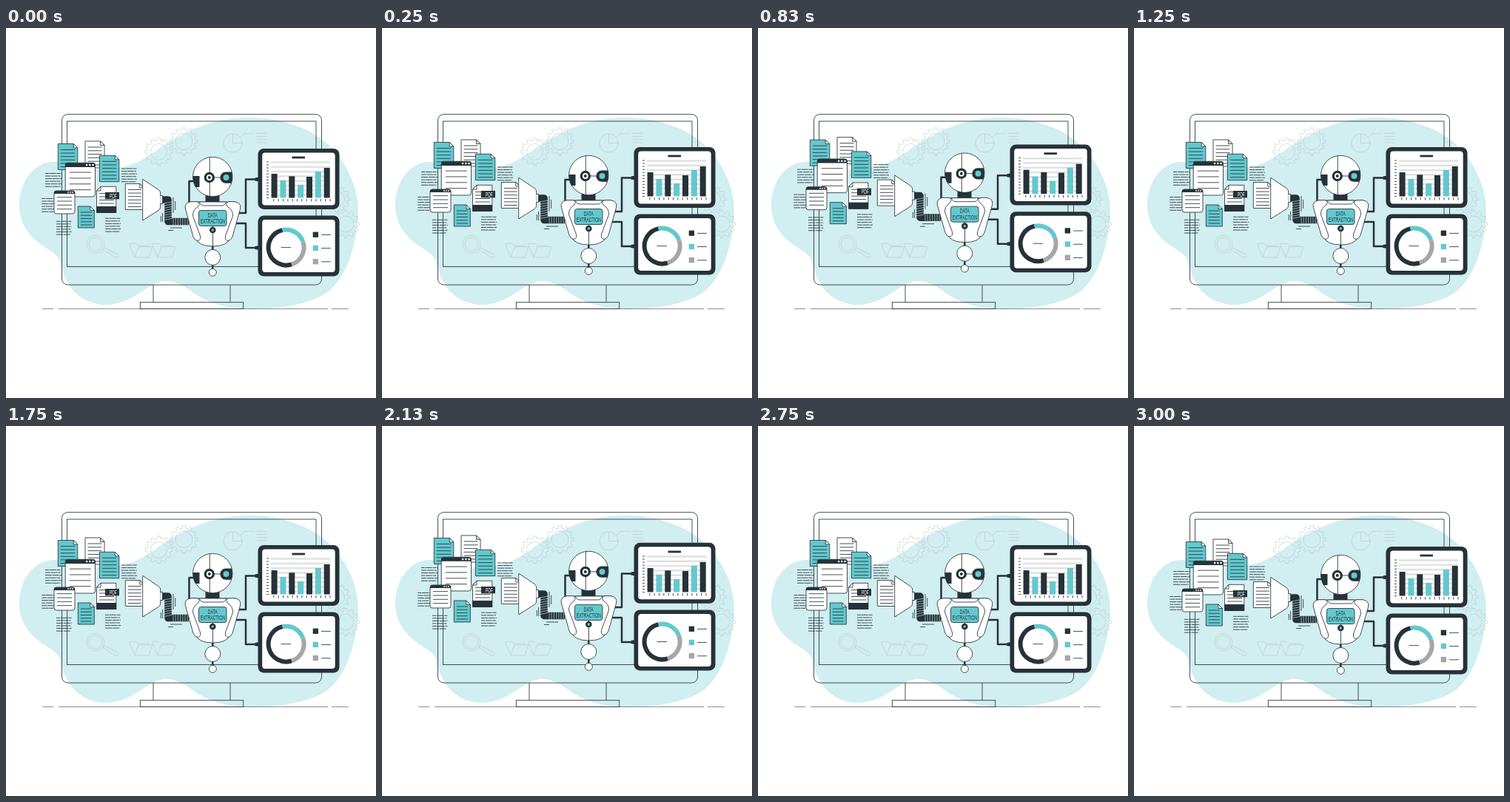
An HTML page for the animation above (3040 ms loop, 500 by 500 pixels).

```html
<!DOCTYPE html>
<html lang="en">
<head>
<meta charset="utf-8">
<title>Data extraction</title>
<style>
  html, body { margin: 0; width: 100%; height: 100%; overflow: hidden; background: #fff; }
  svg { display: block; width: 100%; height: 100%; }
  text { font-family: "Liberation Sans", Arial, sans-serif; text-anchor: middle; stroke: none; }
  .line { fill: none; stroke: #263238; stroke-width: .85; }
  .faint { fill: none; stroke: #bfcacc; stroke-width: .65; }
  .white { fill: #fff; stroke: #263238; stroke-width: .85; }
  .teal { fill: #62c9cf; stroke: #263238; stroke-width: .85; }
  .dark { fill: #263238; }
  .pipe { fill: none; stroke: #263238; stroke-width: 2.5; stroke-linejoin: round; }
</style>
</head>
<body>
<svg viewBox="0 0 500 500">
  <path fill="#d1eef0" d="M328 121C378 121 423 139 448 171C467 196 476 222 476 248C475 284 464 327 442 350C423 371 379 379 335 380C304 380 279 374 258 361C242 349 230 342 215 342C192 342 173 374 134 374C105 373 89 356 81 340C73 322 78 312 60 301C37 287 18 270 18 240C18 208 37 182 63 181C87 181 94 190 122 191C156 193 182 183 211 160C247 136 285 121 328 121Z"/>
  <g id="backdrop"></g>
  <g class="line">
    <rect x="75.5" y="116.6" width="351" height="230.5" rx="8"/>
    <rect x="82.5" y="126" width="336.5" height="196.5"/>
    <path d="M199 347V370.5M303 347V370.5"/>
    <path d="M49 379.5H64M71 379.5H435M440 379.5H463" stroke-width=".55"/>
    <rect x="181.3" y="370.7" width="139.4" height="8.8"/>
  </g>
  <g id="floating">
    <g id="papers"></g>
    <g id="robot">
      <path class="pipe" d="M256 207H247.5V258M310 250H324V204.5H341M308 264H324V297H341"/>
      <path stroke="#263238" stroke-width="5" stroke-linecap="round" d="M338.5 204.5H341M338.5 297H341"/>
      <path class="dark" d="M269.5 224H288.5V236H269.5Z"/>
      <circle class="white" cx="279.3" cy="201" r="26.7"/>
      <path class="line" d="M275.3 174.8V196M275.3 208V227M281 202H291"/>
      <path class="dark" d="M252.5 200H261.5V215H256Q252.5 209 252.5 200Z"/>
      <path class="dark" d="M305 194.5H297A7.5 7.5 0 0 0 297 209.8H304.5Q307 202 305 194.5Z"/>
      <circle cx="297.5" cy="202" r="4" fill="#62c9cf"/>
      <circle class="dark" cx="274.8" cy="202" r="7.2"/>
      <circle cx="274.8" cy="202" r="3.9" fill="#fff"/>
      <circle class="dark" cx="274.8" cy="202" r="2"/>
      <path class="white" d="M250 235H309Q316 236 315 245L303 284Q299 295 279.5 295Q260 295 256 284L244 245Q243 236 250 235Z"/>
      <path class="line" d="M279.5 268V295"/>
      <path class="white" d="M261 235H298L296 238Q295 240 292 240H267Q264 240 263 238Z"/>
      <path id="arm" class="white" d="M250 234.7H258Q263 236 260 241Q252 246 252.5 254L262.5 281Q263.5 287 259 287.5Q255 287 253 282L242.3 244Q241 236 250 234.7Z"/>
      <use href="#arm" transform="translate(559 0) scale(-1 1)"/>
      <rect class="teal" x="260.5" y="246.5" width="37.5" height="21" rx="3"/>
      <g class="dark" font-size="9.2">
        <text transform="translate(279.3 255.7) scale(.56 1)">DATA</text>
        <text transform="translate(279.3 264.1) scale(.56 1)">EXTRACTION</text>
      </g>
      <circle class="dark" cx="279.3" cy="273" r="4.3"/>
      <circle cx="279.3" cy="273" r="1.7" fill="#62c9cf"/>
      <path class="pipe" d="M279.3 295V300M279.3 320V326"/>
      <circle class="white" cx="279.3" cy="310" r="10.5"/>
      <circle class="white" cx="279.3" cy="330.3" r="5"/>
    </g>
    <g id="panels"></g>
  </g>
</svg>
<script>
const DARK = '#263238', TEAL = '#62c9cf', GRAY = '#a6a6a6';
const $ = id => document.getElementById(id);
const range = (n, fn) => Array.from({ length: n }, (_, i) => fn(i)).join('');
const path = (d, cls = 'line', extra = '') => `<path class="${cls}" d="${d}" ${extra}/>`;
const rect = (x, y, w, h, fill, rx = 0) =>
  `<rect x="${x}" y="${y}" width="${w}" height="${h}" rx="${rx}" fill="${fill}"/>`;
const rows = (x, y, w, n, gap) => range(n, i => `M${x} ${y + i * gap}h${w}`);

function gear(cx, cy, r, hole) {
  const teeth = 12, step = Math.PI * 2 / teeth;
  const points = [];
  for (let i = 0; i < teeth; i++) {
    for (const [at, radius] of [[-.28, r - 3], [-.2, r], [.2, r], [.28, r - 3]]) {
      const a = (i + at) * step;
      points.push(`${(cx + radius * Math.cos(a)).toFixed(1)} ${(cy + radius * Math.sin(a)).toFixed(1)}`);
    }
  }
  return path(`M${points.join('L')}Z`, 'faint') +
    `<circle class="faint" cx="${cx}" cy="${cy}" r="${hole}"/>`;
}

function page(x, y, w, h, cls, lines = 6) {
  const fold = 5.5;
  return path(`M${x} ${y}h${w - fold}l${fold} ${fold}v${h - fold}h${-w}Z`, cls) +
    path(`M${x + w - fold} ${y}v${fold}h${fold}Z`, 'white') +
    path(rows(x + 3.5, y + 8, w - 7, lines, (h - 12) / (lines - 1)));
}

function browser(x, y, w, h, bar) {
  return `<rect class="white" x="${x}" y="${y}" width="${w}" height="${h}" rx="3"/>` +
    path(`M${x} ${y + bar}V${y + 2.5}q0 -2.5 2.5 -2.5h${w - 5}q2.5 0 2.5 2.5v${bar - 2.5}Z`, 'dark') +
    range(3, i => `<circle cx="${x + w - 3 - i * bar * .75}" cy="${y + bar / 2}" r="${bar * .23}" fill="#fff"/>`) +
    path(rows(x + w * .14, y + h * .28, w * .72, 4, h * .172));
}

const paragraph = (x, y, w) => range(6, i =>
  path(`M${x} ${y + i * 3.55}h${w - i % 2}`, 'line', `stroke-dasharray="${5 + i % 3 * 2} .7 9 .8"`));

$('backdrop').innerHTML =
  gear(206.5, 167.3, 18.5, 11) + gear(240.3, 153.3, 18.5, 11.5) +
  gear(446.5, 231, 18, 11) + gear(459, 265, 18.5, 11) +
  path('M306.5 143a12.5 12.5 0 1 0 12.5 12.5H306.5ZM306.5 143a12.5 12.5 0 0 1 12.5 12.5M316 148L323 142.3H334', 'faint') +
  path(rows(338.5, 142.3, 14, 4, 4.2), 'faint') +
  '<circle class="faint" cx="121" cy="292.3" r="12"/><circle class="faint" cx="121" cy="292.3" r="9"/>' +
  path('M131 299L133 297L150 305.5Q154 308.5 151 310Q149 311 146 309Z', 'faint') +
  [0, 31].map(dx => path(`M${174 + dx} 310L${167 + dx} 293.5V291.5H${176 + dx}L${178 + dx} 294H${193 + dx}V296M${174 + dx} 310H${193 + dx}L${198 + dx} 295.5H${179 + dx}L${174 + dx} 310`, 'faint')).join('');

const hose = 'M211.5 232H219V261.5H247';
const grooves = range(8, i => `M213.5 ${237 + i * 3.2}L224.5 ${235 + i * 3.2}`) +
  range(7, i => `M${226 + i * 3.2} 256.5V266.5`);
$('papers').innerHTML =
  paragraph(53, 196.5, 22) + paragraph(156, 190, 21) + paragraph(48.3, 230.5, 17) +
  paragraph(68, 261.3, 20.5) + paragraph(134, 257.3, 21) +
  page(70.3, 156.5, 26.5, 35, 'teal') + page(107, 153, 26, 36, 'white') +
  browser(80.2, 182.3, 40.3, 45.7, 5.6) +
  page(126.4, 172.3, 26.4, 35.4, 'teal') +
  browser(65, 220, 28, 31, 4) +
  page(97.3, 241, 22, 29, 'teal', 5) +
  path('M128 214.3H148.8V249.5H122.5V220Z', 'white') + path('M128 214.3V220H122.5Z', 'white') +
  path(rows(126, 223.5, 20, 4, 4.5)) +
  rect(122.3, 241, 26.8, 9, DARK) + rect(134, 222, 19, 9.3, DARK) +
  '<text transform="translate(144.8 229.7) scale(.58 1)" font-size="8.4" fill="#fff">PDF</text>' +
  page(161.3, 210.5, 25, 35, 'white') +
  path('M184.7 204.3L206 218.5Q208.5 220 208.7 223V242Q208.5 245 206 246.5L184.7 260Z', 'white') +
  rect(208.5, 226.5, 3, 11, '#fff') + path('M208.5 226.5h3v11h-3') +
  path(hose, 'pipe', 'style="stroke-width:9.6"') +
  path(grooves, 'line', 'style="stroke:#d1eef0;stroke-width:.6"') +
  path('M226 229V250M228.7 234V246M209.3 254V262M211.7 250V262M222 270H238M219 273.5H226');

function panel(y) {
  return rect(340.5, y, 110, 82, DARK, 8) + rect(346.2, y + 5.5, 98.5, 71, '#fff', 4);
}

function barChart() {
  const tops = [197, 206, 200.3, 212, 201, 194, 189];
  return rect(386.5, 173.6, 17.5, 2.8, DARK) +
    range(8, i => rect(358, 180.2 + i * 6.3, 80, 2.6, '#e2e2e2')) +
    path(rows(352, 181, 3, 13, 4.05)) +
    range(13, i => path(`M${361.8 + i * 6.35} 231v3.5`)) +
    tops.map((top, i) => rect(358.6 + i * 11.85, top, 8, 229.5 - top, i % 2 ? TEAL : DARK)).join('');
}

function arc(from, to, color) {
  const at = deg => {
    const a = (deg - 90) * Math.PI / 180;
    return `${378.6 + 24 * Math.cos(a)} ${296.6 + 24 * Math.sin(a)}`;
  };
  return `<path fill="none" stroke="${color}" stroke-width="6" d="M${at(from)}A24 24 0 ${to - from > 180 ? 1 : 0} 1 ${at(to)}"/>`;
}

const legend = [DARK, TEAL, GRAY].map((color, i) =>
  rect(414.7, 275.6 + i * 18.2, 7.3, 7.3, color) + path(`M426 ${279.4 + i * 18.2}h13`)).join('');

$('panels').innerHTML =
  panel(162.9) + barChart() +
  panel(253.5) + arc(162, 348, DARK) + arc(-12, 72, TEAL) + arc(72, 162, GRAY) +
  path('M371.5 296.6h13.5') + legend;

const LOOP = 3040, PERIOD = 1500, RISE = 6;
const start = performance.now();

function draw(now) {
  const t = Math.min(Math.max(0, now - start) % LOOP, 2 * PERIOD);
  const phase = t % PERIOD / PERIOD;
  const lift = RISE * (1 - Math.abs(1 - 2 * phase));
  $('floating').setAttribute('transform', `translate(0 ${-lift.toFixed(3)})`);
  requestAnimationFrame(draw);
}
draw(start);
</script>
</body>
</html>
```
